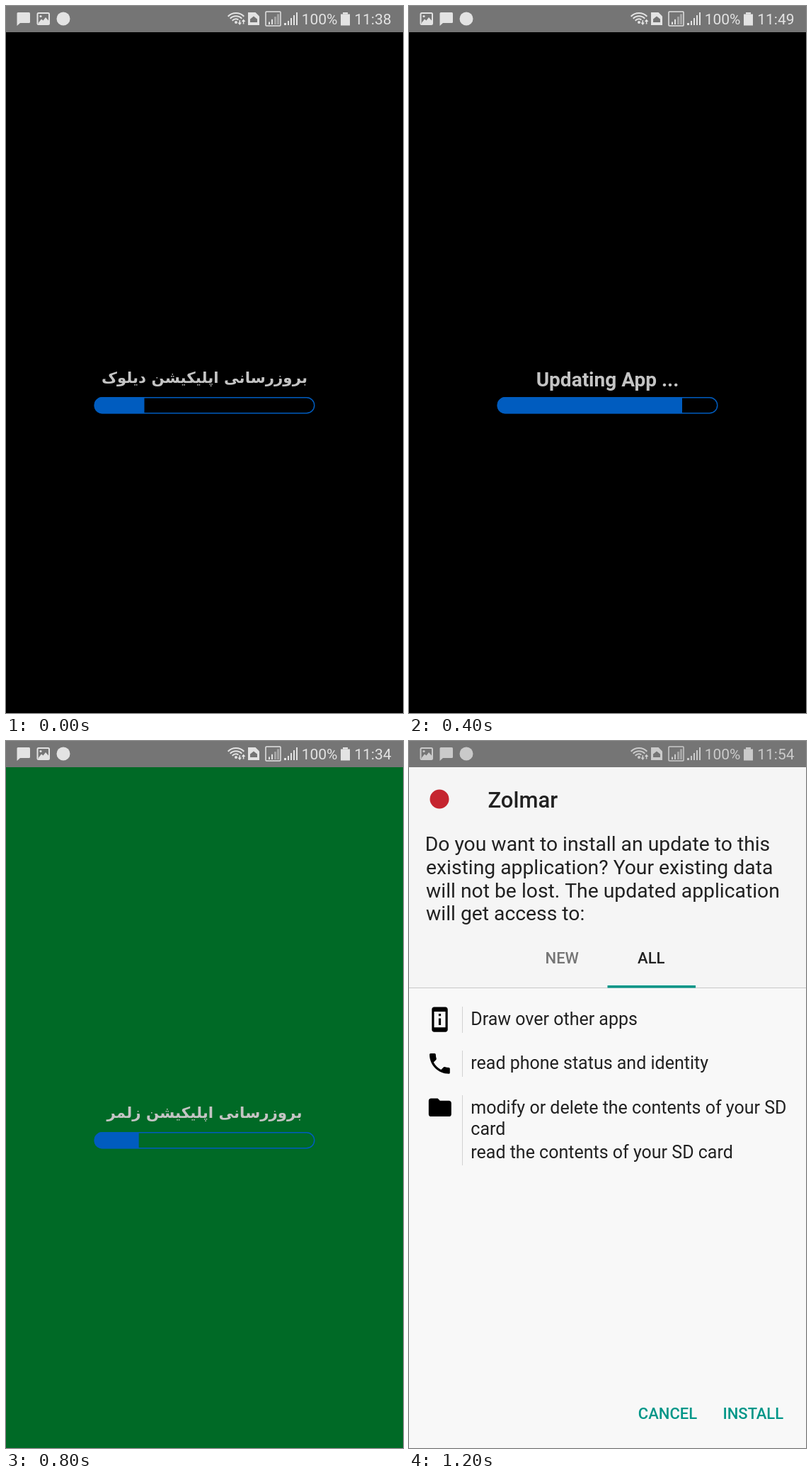
Animation, 561 px wide and 998 px high, one loop 1.4 s. Source, as an HTML page with a canvas:

```html
<!DOCTYPE html>
<html lang="en">
<head>
<meta charset="utf-8">
<title>App update</title>
<style>
  html, body { margin: 0; width: 100%; height: 100%; overflow: hidden; background: #000; }
  canvas { display: block; }
</style>
</head>
<body>
<canvas id="stage" width="561" height="998"></canvas>
<script>
const ctx = document.getElementById('stage').getContext('2d');
const W = 561, H = 998, STEP = 200;
const GREY = '#757575', GREEN = '#006a26', BLUE = '#005cbf', TEAL = '#009688';
const LATIN = 'Roboto, sans-serif';
const PERSIAN = '"DejaVu Sans", sans-serif';
const UPDATE_A = 'بروزرسانی اپلیکیشن دیلوک';
const UPDATE_B = 'بروزرسانی اپلیکیشن زلمر';

const scenes = [
  { icons: [chat, photo, disc], clock: '11:38', bg: '#000', label: UPDATE_A, end: 195.5 },
  { icons: [photo, chat, disc], clock: '11:38', bg: '#000', label: UPDATE_A, end: 285.3 },
  { icons: [photo, chat, disc], clock: '11:49', bg: '#000', label: 'Updating App ...', latin: true, end: 386 },
  { icons: [chat, disc], clock: '11:24', bg: GREEN, bar: '#008f32', label: 'آپدیت اپلیکشن زلمر', end: 133.5, top: 514.5 },
  { icons: [chat, photo, disc], clock: '11:34', bg: GREEN, label: UPDATE_B, end: 187.7 },
  { icons: [photo, chat, disc], clock: '11:34', bg: GREEN, label: UPDATE_B, end: 287 },
  { icons: [photo, chat, disc], clock: '11:54', bg: '#f8f8f8', dialog: true }
];

const glyphs = {
  device: 'M13 7h-2v2h2V7zm0 4h-2v6h2v-6zm4-10H7c-1.1 0-2 .9-2 2v18c0 1.1.9 2 2 2h10c1.1 0 2-.9 2-2V3c0-1.1-.9-2-2-2zM17 19H7V5h10v14z',
  call: 'M6.62 10.79c1.44 2.83 3.76 5.14 6.59 6.59l2.2-2.2c.27-.27.67-.36 1.02-.24 1.12.37 2.33.57 3.57.57.55 0 1 .45 1 1V20c0 .55-.45 1-1 1-9.39 0-17-7.61-17-17 0-.55.45-1 1-1h3.5c.55 0 1 .45 1 1 0 1.25.2 2.45.57 3.57.11.35.03.74-.25 1.02l-2.2 2.2z',
  folder: 'M10 4H4c-1.1 0-2 .9-2 2v12c0 1.1.9 2 2 2h16c1.1 0 2-.9 2-2V8c0-1.1-.9-2-2-2h-8l-2-2z'
};

function rect(x, y, w, h, color) {
  ctx.fillStyle = color;
  ctx.fillRect(x, y, w, h);
}

function text(str, x, y, size, color, { weight = 400, align = 'left', family = LATIN, dir = 'ltr' } = {}) {
  ctx.font = `${weight} ${size}px ${family}`;
  ctx.textAlign = align;
  ctx.direction = dir;
  ctx.fillStyle = color;
  ctx.fillText(str, x, y);
}

function poly(points, color) {
  ctx.beginPath();
  points.forEach(([x, y]) => ctx.lineTo(x, y));
  ctx.closePath();
  ctx.fillStyle = color;
  ctx.fill();
}

function round(x, y, w, h, r) {
  ctx.beginPath();
  ctx.roundRect(x, y, w, h, r);
}

function circle(x, y, r, color) {
  ctx.beginPath();
  ctx.arc(x, y, r, 0, Math.PI * 2);
  ctx.fillStyle = color;
  ctx.fill();
}

function glyph(name, x, y) {
  ctx.save();
  ctx.translate(x, y);
  ctx.scale(1.6, 1.6);
  ctx.fillStyle = '#000';
  ctx.fill(new Path2D(glyphs[name]), 'evenodd');
  ctx.restore();
}

// Notification icons, each in a 19px cell starting at x
function chat(x, ink) {
  round(x + 0.5, 9, 18.5, 15, [1.5, 1.5, 1.5, 0]);
  ctx.fillStyle = ink;
  ctx.fill();
  poly([[x + 0.5, 24], [x + 5, 24], [x + 0.5, 28]], ink);
}

function photo(x, ink) {
  ctx.strokeStyle = ink;
  ctx.lineWidth = 2;
  round(x + 1.5, 10, 16.5, 16, 1.5);
  ctx.stroke();
  circle(x + 6, 14.5, 1.6, ink);
  poly([[x + 3, 23.5], [x + 7, 18.5], [x + 9.5, 20.5], [x + 13, 16], [x + 17, 20.5], [x + 17, 25], [x + 3, 25]], ink);
}

function disc(x, ink) {
  circle(x + 10, 18, 9.5, ink);
}

function wifi(ink) {
  ctx.strokeStyle = ink;
  ctx.lineWidth = 2;
  for (const r of [7.5, 11.7, 16]) {
    ctx.beginPath();
    ctx.arc(325, 26, r, -Math.PI * 0.75, -Math.PI * (r < 8 ? 0.35 : 0.25));
    ctx.stroke();
  }
  circle(325, 23, 2, ink);
  rect(329.5, 20, 1.6, 4, ink);
  poly([[327.5, 23.5], [333, 23.5], [330.3, 27]], ink);
  rect(334.8, 21, 1.6, 4.5, ink);
  poly([[332.8, 22], [338.4, 22], [335.6, 18.5]], ink);
}

function sim(ink, back) {
  poly([[342, 9], [352.5, 9], [358, 14.5], [358, 27], [342, 27]], ink);
  poly([[345, 18.5], [350, 14.5], [355, 18.5], [355, 23], [345, 23]], back);
}

function signal(ink, dim) {
  ctx.strokeStyle = ink;
  ctx.lineWidth = 1.5;
  round(367, 8, 21, 20, 1);
  ctx.stroke();
  for (let i = 0; i < 4; i++) {
    const h = 3.5 + i * 3.7;
    rect(371 + i * 4, 26 - h, i < 2 ? 2 : 3, h, i < 2 ? ink : dim);
  }
  rect(393, 24, 3, 3, ink);
  for (let i = 1; i < 5; i++) {
    const h = 2 + i * 4;
    rect(394 + i * 4, 27 - h, 2, h, ink);
  }
}

function statusBar({ icons, clock, bar = GREY, dialog }) {
  const ink = `rgba(255,255,255,${dialog ? 0.62 : 0.8})`;
  rect(0, 0, W, 37, bar);
  icons.forEach((icon, i) => icon(15 + i * 28, ink));
  wifi(ink);
  sim(ink, bar);
  signal(ink, 'rgba(255,255,255,.35)');
  text('100%', 468.5, 26, 21, ink, { align: 'right' });
  rect(476, 9, 7, 2.5, ink);
  rect(473, 11.5, 13, 16, ink);
  text(clock, 544.5, 26, 21, ink, { align: 'right' });
}

function progress({ label, latin, end, top = 552 }) {
  if (latin) text(label, 280.5, top - 15, 28, '#c4c4c4', { weight: 700, align: 'center' });
  else text(label, 280.5, top - 20, 21.4, '#c4c4c4', { weight: 700, align: 'center', family: PERSIAN, dir: 'rtl' });
  ctx.save();
  round(124.5, top, 312, 23.5, 11.75);
  ctx.clip();
  rect(124.5, top, end - 124.5, 23.5, BLUE);
  ctx.restore();
  ctx.strokeStyle = BLUE;
  ctx.lineWidth = 1.5;
  round(125.25, top + 0.75, 310.5, 22, 11);
  ctx.stroke();
}

function dialog() {
  const dark = '#212121', bold = { weight: 500 };
  rect(0, 37, W, 311, '#f5f5f5');
  circle(43, 82, 13.5, '#c5252f');
  text('Zolmar', 111.5, 94, 31, dark, bold);
  [
    'Do you want to install an update to this',
    'existing application? Your existing data',
    'will not be lost. The updated application',
    'will get access to:'
  ].forEach((line, i) => text(line, i ? 24 : 22.7, 155 + i * 32.8, 28.3, dark));

  text('NEW', 192.5, 314, 22, '#757575', bold);
  text('ALL', 323, 314, 22, dark, bold);
  rect(0, 348, W, 1, '#c9c9c9');
  rect(280.5, 345, 124.5, 3.5, TEAL);

  [[375, 37], [437, 37], [500, 99]].forEach(([y, h]) => rect(75, y, 1, h, '#d2d2d2'));
  glyph('device', 24.3, 373.9);
  glyph('call', 24.2, 436.2);
  glyph('folder', 24.6, 498.1);
  [
    ['Draw over other apps', 401],
    ['read phone status and identity', 463],
    ['modify or delete the contents of your SD', 526],
    ['card', 555.5],
    ['read the contents of your SD card', 588.5]
  ].forEach(([line, y]) => text(line, 87.3, y, 25, dark));

  text('CANCEL', 323.8, 957, 22, TEAL, bold);
  text('INSTALL', 443.5, 957, 22, TEAL, bold);
}

function draw(now) {
  const scene = scenes[Math.floor(now / STEP) % scenes.length];
  rect(0, 0, W, H, scene.bg);
  if (scene.dialog) dialog();
  else progress(scene);
  statusBar(scene);
}

const start = performance.now();
function tick() {
  draw(performance.now() - start);
  requestAnimationFrame(tick);
}
tick();
</script>
</body>
</html>
```
